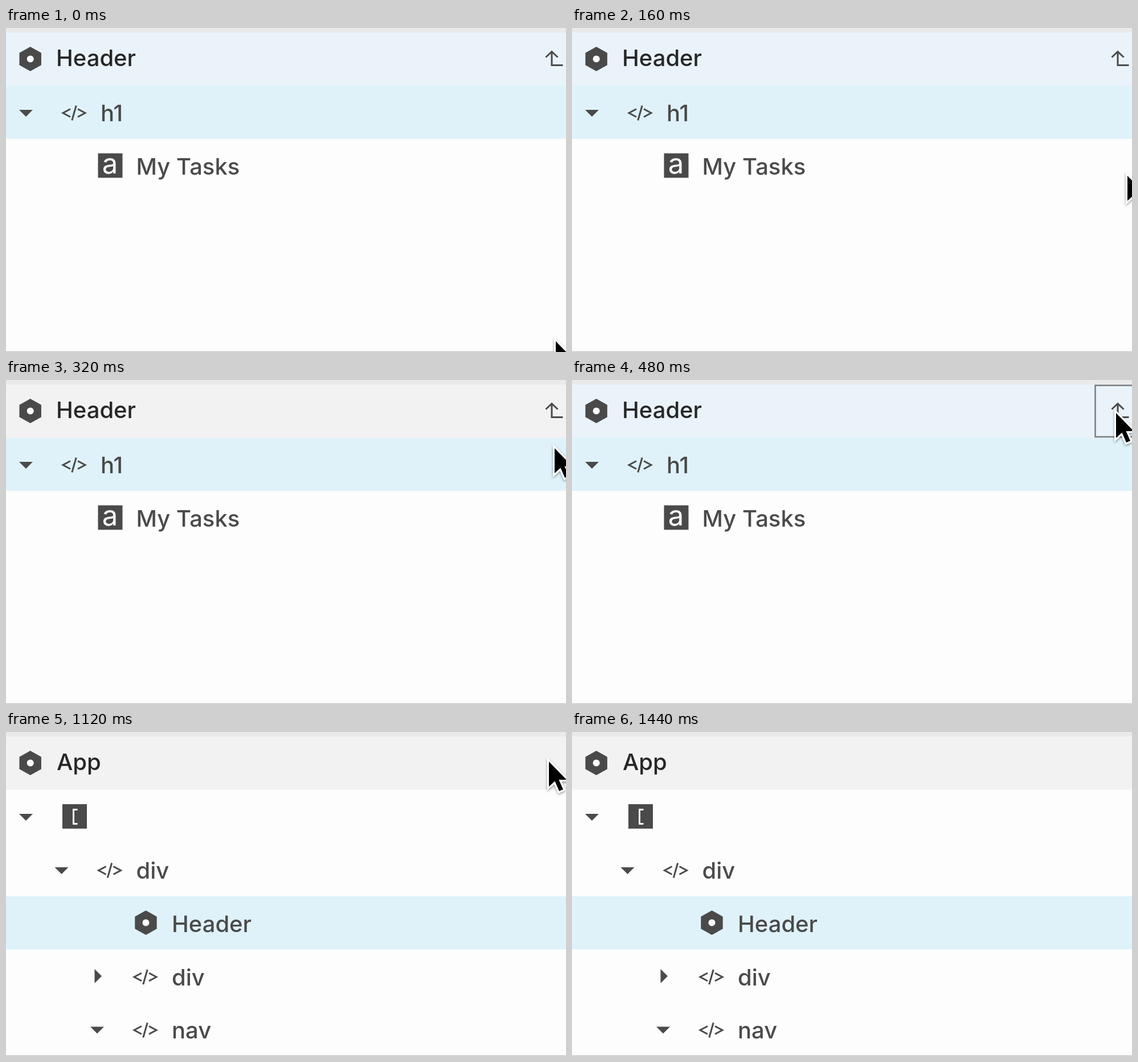
Write an HTML page that moves like this. It is 983 by 570 pixels and loops after 1520 ms.

```html
<!DOCTYPE html>
<html lang="en">
<head>
<meta charset="utf-8">
<title>Component tree</title>
<style>
  html, body { margin: 0; width: 100%; height: 100%; overflow: hidden; background: #fdfdfd; }
  svg { display: block; width: 983px; height: 570px; }
  text { font: 500 40px Inter, Roboto, sans-serif; fill: #4a4a4a; }
  .title { fill: #262626; }
  .glyph { font-size: 49px; font-weight: 400; fill: #fdfdfd; text-anchor: middle; }
  .ink { fill: #4a4a4a; }
  .line { fill: none; stroke: #4a4a4a; stroke-width: 3; }
  .hover { fill: #eaf3fa; }
  .selected { fill: #dff2fa; }

  .timed { animation: 1520ms step-end infinite; }
  #detail { animation-name: detail; }
  #app { animation-name: app; }
  #titleHover { animation-name: title-hover; }
  #textHover { animation-name: text-hover; }
  #button { animation-name: button; }
  #cursor { animation-name: cursor; }

  @keyframes detail { 0% { visibility: visible } 73.68%, 100% { visibility: hidden } }
  @keyframes app { 0% { visibility: hidden } 73.68%, 100% { visibility: visible } }
  @keyframes title-hover {
    0% { opacity: 1 } 15.78% { opacity: 0 } 26.31%, 100% { opacity: 1 }
  }
  @keyframes text-hover {
    0% { opacity: 0 } 15.78% { opacity: 1 } 21.05%, 100% { opacity: 0 }
  }
  @keyframes button { 0% { opacity: 0 } 26.31%, 100% { opacity: 1 } }
  @keyframes cursor {
    0% { transform: translate(965px, 551px) }
    5.26% { transform: translate(972px, 385px) }
    10.52% { transform: translate(975px, 260px) }
    15.78% { transform: translate(977px, 199px) }
    21.05% { transform: translate(963px, 120px) }
    26.31% { transform: translate(957px, 76px) }
    31.57% { transform: translate(955px, 58px) }
    36.84% { transform: translate(954px, 51px) }
    47.36% { transform: translate(953px, 52px) }
    89.47% { transform: translate(966px, 176px) }
    94.73%, 100% { transform: translate(1020px, 300px) }
  }
</style>
</head>
<body>
<svg viewBox="0 0 983 570">
  <defs>
    <g id="hex">
      <path class="ink" d="M0-21.5 19.2-10.8V10.8L0 21.5-19.2 10.8V-10.8Z"/>
      <circle r="6" fill="#fdfdfd"/>
    </g>
    <path id="tag" class="line" d="M-6.5-7-19.5 0-6.5 7M3.7-13-3.7 13M6.5-7 19.5 0 6.5 7"/>
    <path id="open" class="ink" d="M-12-6H12L0 6Z"/>
    <path id="closed" class="ink" d="M-6-12.5 6.5 0-6 12.5Z"/>
    <rect id="tile" class="ink" x="-21.5" y="-21.5" width="43" height="43"/>
    <path id="arrow" d="M0 0V44L10.5 34.5 18 52 25 49 17.5 32H31Z"/>
    <filter id="shadow" x="-50%" y="-30%" width="200%" height="170%">
      <feDropShadow dx="0" dy="2" stdDeviation="2" flood-opacity=".4"/>
    </filter>
  </defs>

  <rect width="983" height="570" fill="#fdfdfd"/>
  <rect width="983" height="8" fill="#eaeaea"/>
  <rect y="8" width="983" height="93.5" fill="#f2f2f2"/>

  <g id="detail" class="timed">
    <rect id="titleHover" class="timed hover" y="8" width="983" height="93.5"/>
    <rect class="selected" y="101.5" width="983" height="93.5"/>
    <rect id="textHover" class="timed hover" y="195" width="983" height="94"/>
    <text class="title" x="88" y="67">Header</text>
    <path class="line" d="M947.5 51.5 958 41.5 968.5 51.5M958 42V65.5H977.5"/>
    <path id="button" class="timed" d="M990 9.5H918.5V100H990" fill="none" stroke="#7c7c7c" stroke-width="2.5"/>
    <use href="#open" x="35" y="150"/>
    <use href="#tag" x="119.5" y="149.5"/>
    <text x="166" y="164">h1</text>
    <use href="#tile" x="183" y="242"/>
    <text class="glyph" x="182.5" y="256">a</text>
    <text x="228.5" y="258">My Tasks</text>
  </g>

  <g id="app" class="timed">
    <rect class="selected" y="289" width="983" height="93.5"/>
    <text class="title" x="89" y="67">App</text>
    <use href="#open" x="35" y="150"/>
    <use href="#tile" x="120.5" y="148.5"/>
    <path d="M125.5 136.5H118.5V161.5H125.5" fill="none" stroke="#fdfdfd" stroke-width="3"/>
    <use href="#open" x="97.5" y="244"/>
    <use href="#tag" x="182" y="243.5"/>
    <text x="228.5" y="258">div</text>
    <use href="#hex" x="245.5" y="335.5"/>
    <text x="291" y="352">Header</text>
    <use href="#closed" x="161.5" y="429.5"/>
    <use href="#tag" x="244.5" y="431"/>
    <text x="291" y="445.5">div</text>
    <use href="#open" x="160" y="524.5"/>
    <use href="#tag" x="244.5" y="524.5"/>
    <text x="291" y="539">nav</text>
  </g>

  <use href="#hex" x="42.7" y="54.5"/>
  <rect y="569" width="983" height="1" fill="#b8b8b8"/>

  <g id="cursor" class="timed">
    <use href="#arrow" fill="#fff" stroke="#fff" stroke-width="6" filter="url(#shadow)"/>
    <use href="#arrow"/>
  </g>
</svg>
</body>
</html>
```
